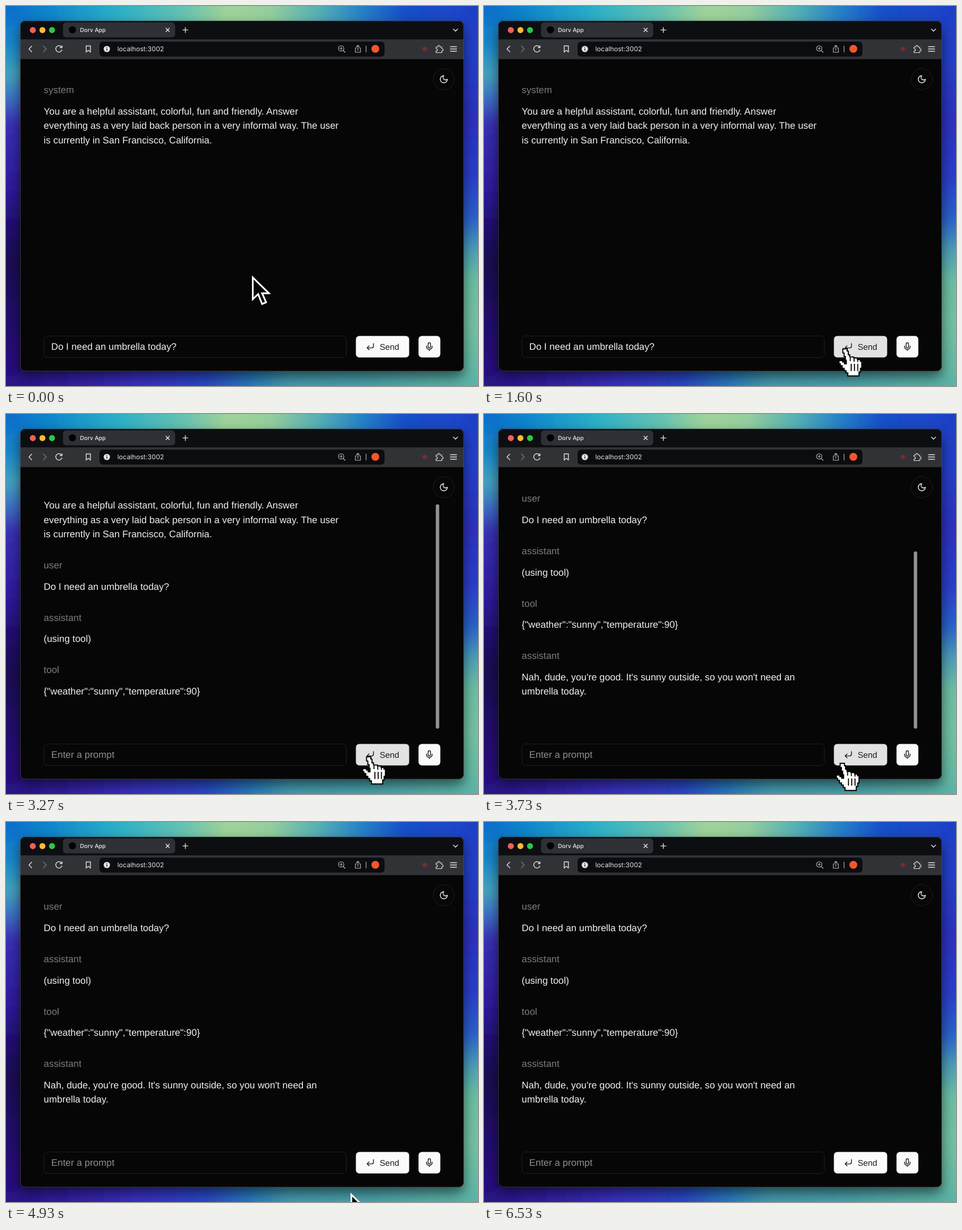
An HTML page for the animation above (6.59 s loop, 833 px wide and 672 px high).

```html
<!DOCTYPE html>
<html lang="en">
<head>
<meta charset="utf-8">
<title>Chat demo</title>
<style>
  html, body { margin: 0; width: 100%; height: 100%; overflow: hidden; background: #150a50; }
  svg { display: block; width: 100vw; height: 100vh; }
  text { font-family: "Liberation Sans", Arial, sans-serif; font-size: 16.88px; white-space: pre; text-rendering: geometricPrecision; }
  .ui { font-family: Inter, sans-serif; }
  .line { fill: none; stroke: #dedee2; stroke-width: 1.4; stroke-linecap: round; stroke-linejoin: round; }
  .lucide { fill: none; stroke-width: 2; stroke-linecap: round; stroke-linejoin: round; }
</style>
</head>
<body>
<svg viewBox="0 0 833 672" preserveAspectRatio="none">
  <defs>
    <filter id="soft" x="-10%" y="-10%" width="120%" height="120%"><feGaussianBlur stdDeviation="7"/></filter>
    <filter id="shade" x="-10%" y="-10%" width="120%" height="120%"><feGaussianBlur stdDeviation="11"/></filter>
    <clipPath id="chatClip"><rect x="60" y="136" width="690" height="421"/></clipPath>
    <clipPath id="frameClip"><rect x="25" y="26" width="783" height="620" rx="9"/></clipPath>
  </defs>

  <g id="wallpaper" filter="url(#soft)"></g>
  <rect x="25" y="36" width="783" height="620" rx="12" fill="#000" opacity=".55" filter="url(#shade)"/>

  <g clip-path="url(#frameClip)">
    <rect x="25" y="26" width="783" height="620" fill="#060607"/>
    <rect x="25" y="26" width="783" height="33" fill="#0d0e12"/>
    <rect x="25" y="59" width="783" height="35" fill="#313236"/>
  </g>
  <rect x="25.5" y="26.5" width="782" height="619" rx="8.5" fill="none" stroke="#55555a" stroke-opacity=".6"/>

  <!-- tab strip -->
  <circle cx="47.3" cy="42.6" r="5.3" fill="#f0605a"/>
  <circle cx="64.3" cy="42.6" r="5.3" fill="#f7bd32"/>
  <circle cx="81.2" cy="42.6" r="5.3" fill="#2fc745"/>
  <rect x="100.5" y="29" width="198" height="26.5" rx="6" fill="#2f3035"/>
  <circle cx="117.3" cy="42" r="6.3" fill="#000"/>
  <text class="ui" x="130.5" y="45.7" fill="#ececee" style="font-size:10.1px;font-weight:500">Dorv App</text>
  <path class="line" d="M282.3 39.3l6 6m0-6l-6 6M312 42.4h9m-4.5-4.5v9M789.5 40.7l3.8 3.8 3.8-3.8"/>

  <!-- toolbar -->
  <rect x="165" y="63" width="503" height="26.5" rx="6" fill="#0b0c0f"/>
  <path class="line" d="M45.5 71l-5 5 5 5M98.3 73A5.6 5.6 0 1 0 98.7 77.8M98.9 70.3v3.2h-3.4M141.5 70.5h7.5v11l-3.75-3.2-3.75 3.2z"/>
  <path class="line" d="M66 71l5 5-5 5" style="stroke:#77777c"/>
  <circle cx="178" cy="76" r="5.6" fill="#e4e4e8"/>
  <path d="M178 75.3v3.5M178 72.8v1.2" stroke="#0b0c0f" stroke-width="1.4"/>
  <text class="ui" x="196.5" y="80.2" fill="#e6e6ea" style="font-size:11.7px">localhost:3002</text>
  <g class="line" style="stroke:#b6b6bb;stroke-width:1.1">
    <circle cx="591.5" cy="75" r="4.8"/>
    <path d="M595 78.500l3.500 3.500M589.200 75h4.600M591.500 72.700v4.600M618.500 74h-2v7.700h9v-7.700h-2M621 78.500v-9m-2.500 2.500l2.500-2.500 2.500 2.500M635.500 70.500v11"/>
  </g>
  <circle cx="651.8" cy="75.8" r="7" fill="#f2562b"/>
  <circle cx="739" cy="76" r="4" fill="#70302f"/>
  <path class="line" style="stroke-width:1.2" d="M759 72.5h3v-.7a2 2 0 0 1 4 0v.7h3v3h.5a2 2 0 0 1 0 4h-.5v3h-10v-3h.5a2 2 0 0 0 0-4h-.5z"/>
  <path class="line" d="M784.3 72h11M784.3 76h11M784.3 80h11"/>

  <!-- page -->
  <circle cx="772.7" cy="129.5" r="18.7" fill="#070708" stroke="#1d1d20"/>
  <path class="lucide" stroke="#f2f2f2" transform="translate(764.3 121.1) scale(.7)" d="M12 3a6 6 0 0 0 9 9 9 9 0 1 1-9-9Z"/>
  <g clip-path="url(#chatClip)"><g id="chat"></g></g>
  <rect id="thumb" x="758.5" width="6" rx="3" fill="#929292"/>

  <rect x="67" y="583.5" width="533.5" height="38" rx="6" fill="#060607" stroke="#202023"/>
  <text id="prompt" x="79.8" y="608.4"></text>
  <rect id="send" x="617.5" y="583.5" width="94" height="38" rx="6"/>
  <path class="lucide" stroke="#1c1c1e" transform="translate(634.5 594.1) scale(.7)" d="M9 10l-5 5 5 5M20 4v7a4 4 0 0 1-4 4H4"/>
  <text x="659.5" y="607.7" fill="#1c1c1e" style="font-size:14.8px">Send</text>
  <rect x="728" y="583.5" width="38.5" height="38" rx="6" fill="#fafafa"/>
  <path class="lucide" stroke="#1c1c1e" transform="translate(738.7 594.1) scale(.7)" d="M12 2a3 3 0 0 0-3 3v7a3 3 0 0 0 6 0V5a3 3 0 0 0-3-3ZM19 10v2a7 7 0 0 1-14 0v-2M12 19v3"/>

  <g id="pointer">
    <path id="arrow" d="M1.5 4V42.5L11 33.5L18 51L25 48L18 32H30Z" fill="#050505" stroke="#fff" stroke-width="3"/>
    <g id="hand" transform="translate(-13 -2) scale(3.2)">
      <path d="M2.8 .7H5V2H5.600V4H6.400V5.200H8.600V5.800H10.600V6.600H12.200V7.500H13V11.500H12.300V13.500H11.500V15.700H5.300V14H4.300V12.700H3.300V11.500H2.200V10H1.200V9H.5V7.200H2.500V8H3.500V9H4.500V7H4V5H3.300V3H2.600V.7Z" fill="#fff" stroke="#000" stroke-width=".6"/>
      <path d="M6.7 5.5V7.5M8.8 6V7.8M10.8 6.8V8M7.2 9V13M9 9V13M10.8 9V13" stroke="#000" stroke-width=".55"/>
    </g>
  </g>
</svg>
<script>
const LOOP = 6590, FRAME = 1000 / 15;
const SUBMIT = 2100, USE_TOOL = 2700, TOOL = 2950, ANSWER = 3600;
const QUESTION = 'Do I need an umbrella today?';
const $ = id => document.getElementById(id);

function add(parent, tag, attrs, text = '') {
  const node = document.createElementNS('http://www.w3.org/2000/svg', tag);
  for (const key in attrs) node.setAttribute(key, attrs[key]);
  node.textContent = text;
  return parent.appendChild(node);
}

// Wallpaper: one gradient strip per screen edge; each stop is [offset, color].
function edge(name, points, vertical, stops) {
  const end = vertical ? { x2: 0, y2: 672 } : { x2: 833, y2: 0 };
  const paint = add($('wallpaper'), 'linearGradient',
    { id: name, gradientUnits: 'userSpaceOnUse', x1: 0, y1: 0, ...end });
  stops.forEach(([offset, color]) => add(paint, 'stop', { offset, 'stop-color': color }));
  add($('wallpaper'), 'polygon', { points, fill: `url(#${name})` });
}
edge('top', '-40,-40 873,-40 773,60 60,60', false, [[0, '#0a6cca'], [.1, '#1088cc'], [.24, '#2cb0c6'],
  [.38, '#68c2b0'], [.47, '#a0d398'], [.56, '#94ce9e'], [.66, '#56b0b4'], [.75, '#2683c6'], [.84, '#1850c8'], [1, '#1d40c6']]);
edge('right', '873,-40 873,712 773,612 773,60', true, [[0, '#1d40c6'], [.12, '#2340c8'], [.3, '#2d32c0'],
  [.45, '#2a3eca'], [.56, '#2a62cc'], [.64, '#4c9eb8'], [.72, '#6cbea4'], [.84, '#74c2a2'], [1, '#5cb4a6']]);
edge('bottom', '-40,712 873,712 773,612 60,612', false, [[0, '#2a1284'], [.12, '#321ea0'], [.28, '#3a31c2'],
  [.42, '#2c48ca'], [.52, '#2a7cc0'], [.6, '#459cb0'], [.76, '#4ba2ac'], [.9, '#58aea8'], [1, '#5cb4a6']]);
edge('left', '-40,-40 -40,712 60,612 60,60', true, [[0, '#0a6cca'], [.1, '#1888ca'], [.18, '#44a2be'],
  [.24, '#3d74c4'], [.31, '#3830b4'], [.48, '#2e1a9c'], [.58, '#220f70'], [.68, '#1a0950'], [.82, '#220d6a'], [1, '#2a1284']]);

const messages = [
  { at: 0, role: 'system', lines: ['You are a helpful assistant, colorful, fun and friendly. Answer',
    'everything as a very laid back person in a very informal way. The user',
    'is currently in San Francisco, California.'] },
  { at: SUBMIT, role: 'user', lines: [QUESTION] },
  { at: USE_TOOL, role: 'assistant', lines: ['(using tool)'] },
  { at: TOOL, role: 'tool', lines: ['{"weather":"sunny","temperature":90}'] },
  { at: ANSWER, role: 'assistant', lines: ["Nah, dude, you're good. It's sunny outside, so you won't need an", 'umbrella today.'] }
];
let baseline = 154.4;
for (const message of messages) {
  message.group = add($('chat'), 'g', {});
  add(message.group, 'text', { x: 66.6, y: baseline, fill: '#7c7c80' }, message.role);
  baseline += 37.8;
  message.lines.forEach((line, i) =>
    add(message.group, 'text', { x: 66.6, y: baseline + i * 25.2, fill: '#f1f1f1' }, line));
  baseline += (message.lines.length - 1) * 25.2 + 55;
}

const path = [[0, 434, 476], [400, 434, 476], [1300, 638, 606], [2000, 638, 606], [2500, 642, 606],
  [3270, 641, 606], [3550, 641, 606], [4130, 608, 655], [LOOP, 608, 655]];
const clamp = v => Math.max(0, Math.min(1, v));
const ease = v => v * v * (3 - 2 * v);

function pointerAt(t) {
  const i = path.findIndex(key => key[0] > t);
  const [t0, x0, y0] = path[i - 1], [t1, x1, y1] = path[i];
  const k = ease((t - t0) / (t1 - t0));
  return [x0 + (x1 - x0) * k, y0 + (y1 - y0) * k];
}

const show = (node, on) => node.setAttribute('visibility', on ? 'visible' : 'hidden');

function render(t) {
  messages.forEach(m => show(m.group, t >= m.at));
  const scroll = t >= ANSWER ? 142.6 : t >= TOOL ? 24.7 : 0;
  $('chat').setAttribute('transform', `translate(0 ${-scroll})`);

  const view = 420, ratio = view / (view + scroll);
  $('thumb').setAttribute('y', 136.5 + scroll * ratio);
  $('thumb').setAttribute('height', view * ratio);
  $('thumb').setAttribute('opacity', t < TOOL ? 0 : 1 - clamp((t - 4140) / 260));

  const sent = t >= SUBMIT;
  $('prompt').textContent = sent ? 'Enter a prompt' : QUESTION;
  $('prompt').setAttribute('fill', sent ? '#8f8f93' : '#f1f1f1');

  const [x, y] = pointerAt(t);
  const hover = x > 617 && x < 712 && y > 583 && y < 622;
  $('pointer').setAttribute('transform', `translate(${x} ${y})`);
  show($('arrow'), !hover && t < 6000);
  show($('hand'), hover);
  $('send').setAttribute('fill', hover ? '#e2e2e3' : '#fafafa');
}

const start = performance.now();
function tick() {
  const t = (performance.now() - start) % LOOP;
  render(Math.floor((t + 4) / FRAME) * FRAME);
  requestAnimationFrame(tick);
}
tick();
</script>
</body>
</html>
```
